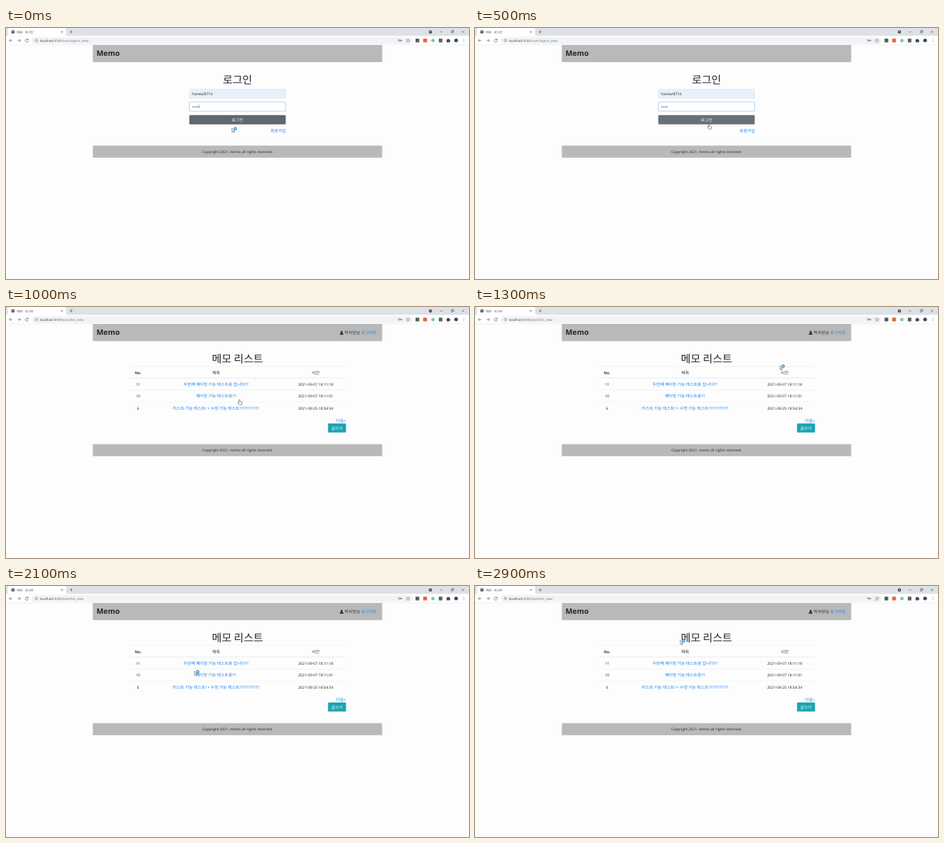
An HTML page for the animation above (3 s loop, 600x325 px).

```html
<!DOCTYPE html>
<html>
<head>
<meta charset="utf-8">
<title>Memo</title>
<style>
  html, body { margin: 0; width: 100%; height: 100%; overflow: hidden; background: #fdfdfd; }
  svg { display: block; width: 600px; height: 325px; }
  text { font-family: "Noto Sans", "Open Sans", "Noto Sans CJK KR", sans-serif; font-size: 4.8px; fill: #2b2f33; text-rendering: geometricPrecision; }
  .ko { font-family: "Noto Sans CJK KR", "Noto Sans CJK JP", "Noto Sans", sans-serif; font-size: 5.4px; }
  .mid { text-anchor: middle; }
  .end { text-anchor: end; }
  .link { fill: #1a82f0; }
  .light { fill: #fff; }
  .title { font-size: 13.8px; fill: #212529; }
  .copy { font-size: 4.67px; }
  .tab { font-size: 4.05px; fill: #4a4d51; }
  .url { font-size: 4.2px; fill: #75797e; }
  .bar { fill: #b9b9b9; }
  .ico { fill: none; stroke: #5f6368; stroke-width: .65; }
</style>
</head>
<body>
<svg viewBox="0 0 600 325">
  <rect width="600" height="325" fill="#fdfdfd"/>

  <g id="browser">
    <rect width="600" height="10.4" fill="#dee1e6"/>
    <path d="M1 10.4Q2.5 10.4 2.5 8.5V2.5Q2.5 0 5 0H75.5Q78 0 78 2.5V8.5Q78 10.4 79.5 10.4Z" fill="#fff"/>
    <g id="globe">
      <circle cx="9" cy="5" r="2.3" fill="#4d5156"/>
      <path d="M7.4 4.2l1.5 .5 .3 1.2 M9.3 3.3l1 1" stroke="#fff" stroke-width=".6" fill="none"/>
    </g>
    <text id="tabTitle" class="ko tab" x="14" y="6.6"/>
    <path class="ico" d="M71.2 3.8l2.5 2.5m0-2.5l-2.5 2.5M82.5 5h4M84.5 3v4"/>
    <circle cx="550" cy="5.1" r="2.2" fill="#44474b"/>
    <path d="M549 4.6h2l-1 1.2z" fill="#fff"/>
    <path class="ico" stroke="#333" d="M562.4 5h3.2M577 4.1h2.3v2.3H577zM577.8 4V3.3h2.3v2.3h-.7M590.9 3.6l2.8 2.8m0-2.8l-2.8 2.8"/>
    <rect y="10.4" width="600" height="11.4" fill="#fff"/>
    <rect x="33" y="11.8" width="494" height="8.9" rx="4.4" fill="#f1f3f4"/>
    <path class="ico" d="M8.3 16.2H4.4M6.2 14.3l-1.9 1.9 1.9 1.9"/>
    <path class="ico" stroke="#999da2" d="M14.8 16.2h4M17 14.3l1.9 1.9-1.9 1.9"/>
    <path id="reload" class="ico" d="M28.7 15.2A2 2 0 1 0 29 16.8M28.9 13.9v1.6h-1.6"/>
    <path id="stop" class="ico" d="M25.4 14.6l3.2 3.2m0-3.2l-3.2 3.2"/>
    <circle class="ico" cx="39.4" cy="16.2" r="1.7" style="stroke-width:.45"/>
    <path class="ico" d="M39.4 16v1.1M39.4 15v.5" style="stroke-width:.45"/>
    <text class="url" x="44" y="17.7"><tspan fill="#3c4043">localhost</tspan><tspan id="path"/></text>
    <circle class="ico" cx="509.5" cy="16.1" r="1.1" stroke-width=".9"/>
    <path class="ico" d="M510.6 16.1h2.7M512.4 16.1v1.2" style="stroke-width:.9"/>
    <path class="ico" d="M521 13.9l.7 1.6 1.7.1-1.3 1.1.4 1.7-1.5-.9-1.5.9.4-1.7-1.3-1.1 1.7-.1z" style="stroke-width:.45"/>
    <rect x="530.7" y="13.8" width="4.8" height="4.8" fill="#55585c"/>
    <rect x="540.6" y="13.8" width="5" height="4.8" fill="#ee6135"/>
    <circle cx="553.3" cy="16.2" r="2.3" fill="#74d195"/>
    <rect x="560.9" y="13.8" width="4.6" height="4.8" fill="#5b5e62"/>
    <path d="M571 14.7h1.4a.8.8 0 0 1 1.6 0h1.2v1.3a.8.8 0 0 1 0 1.6v1h-4.2z" fill="#45484c"/>
    <rect x="580.9" y="13.8" width="4.8" height="4.8" rx="2.4" fill="#354a66"/>
    <path d="M593.2 14.3v.7m0 .9v.7m0 .9v.7" stroke="#5f6368" stroke-width=".8"/>
    <path d="M0 21.9H600" stroke="#dcdfe3" stroke-width=".35"/>
  </g>

  <rect class="bar" x="112.5" y="22" width="375" height="22.2"/>
  <text x="117.3" y="36.2" style="font-size:9.6px;font-weight:600;fill:#212529">Memo</text>

  <g id="login">
    <text class="ko title mid" x="300" y="71.5">로그인</text>
    <rect x="237.6" y="79.2" width="124.8" height="11.7" rx="1.2" fill="#e8f0fe" stroke="#ced4da" stroke-width=".35"/>
    <text x="241.3" y="86.9">haneul4716</text>
    <rect id="ring" x="237" y="95.4" width="126" height="12.9" rx="1.7" fill="#bfdeff"/>
    <rect id="pass" x="237.6" y="96" width="124.8" height="11.7" rx="1.2" fill="#fff" stroke-width=".4"/>
    <g id="dots" fill="#2b2f33"></g>
    <path id="caret" d="M250.1 99.4v5" stroke="#222" stroke-width=".4"/>
    <rect id="button" x="237.5" y="112.8" width="125" height="12" rx="1.2"/>
    <text class="ko mid light" x="300" y="120.8">로그인</text>
    <text class="ko end link" x="362.7" y="135.4">회원가입</text>
  </g>

  <g id="list">
    <circle cx="434.9" cy="32.2" r="1.25" fill="#212529"/>
    <path d="M432.6 35.8v-.7q0-1.5 1.5-1.5h1.6q1.5 0 1.5 1.5v.7z" fill="#212529"/>
    <text class="ko" x="438.8" y="35.2">박서담님</text>
    <text class="ko link end" x="480.2" y="35.2">로그아웃</text>
    <text class="ko title mid" x="300" y="71.5">메모 리스트</text>
    <g id="table"></g>
    <text class="ko link end" x="440.3" y="149.2">다음»</text>
    <rect x="417.3" y="150.8" width="23.3" height="11.8" rx="1.2" fill="#1ba3b1"/>
    <text class="ko mid light" x="429" y="158.8">글쓰기</text>
  </g>

  <g id="footer">
    <rect class="bar" x="112.5" width="375" height="15.6"/>
    <text class="mid copy" x="300" y="9.7">Copyright 2021. memo all rights reserved.</text>
  </g>

  <g id="cursor">
    <g id="busy">
      <path d="M0 0V5.3L1.3 4.1 2.2 6 3 5.6 2.1 3.8H3.7Z" fill="#fff" stroke="#222" stroke-width=".4"/>
      <circle cx="4.3" cy=".7" r="1.6" fill="#cfeaff" stroke="#1f86d8" stroke-width="1.1"/>
    </g>
    <path id="hand" d="M-.6 .5Q0-.4 .6 .5V2.7L3 3.2Q3.6 3.4 3.5 4.2L3 6.7H-.1L-2 4.2Q-1.8 3.4-.6 4.2Z" fill="#fff" stroke="#222" stroke-width=".45"/>
  </g>
</svg>

<script>
const STEP = 100, LOOP = 3000;
const $ = id => document.getElementById(id);
const show = (id, on) => $(id).setAttribute("visibility", on ? "inherit" : "hidden");

function add(parent, tag, attrs, text = "") {
  const el = document.createElementNS("http://www.w3.org/2000/svg", tag);
  for (const key in attrs) el.setAttribute(key, attrs[key]);
  el.textContent = text;
  $(parent).append(el);
}

for (let i = 0; i < 4; i++) add("dots", "circle", { cx: 242.3 + i * 2.15, cy: 102.1, r: .72 });

const rows = [
  ["11", "두번째 페이징 기능 테스트용 입니다!!!", "2021-09-07 18:11:18"],
  ["10", "페이징 기능 테스트용!!!", "2021-09-07 18:11:01"],
  ["6", "리스트 기능 테스트! + 수정 기능 테스트" + "!".repeat(15), "2021-08-25 18:54:34"]
];
const cell = (x, y, text, cls, weight = 400) =>
  add("table", "text", { x, y, class: "mid " + cls, "font-weight": weight }, text);

[76.8, 92, 107.6, 123].forEach((y, i) =>
  add("table", "path", { d: `M159.3 ${y}H440.6`, stroke: "#dee2e6", "stroke-width": i === 1 ? .7 : .4 }));
cell(171.2, 86.5, "No.", "", 700);
cell(272.3, 86.5, "제목", "ko", 500);
cell(401.3, 86.5, "시간", "ko", 500);
rows.forEach(([no, title, date], i) => {
  const y = 101.9 + i * 15.35;
  cell(171.2, y, no, "");
  cell(272.3, y, title, "ko link");
  cell(401.3, y, date, "");
});

// Pointer keys: time, x, y, shape
const track = [
  [0, 292.8, 129.6, "busy"], [100, 294, 133, "busy"], [200, 297, 135, "busy"],
  [300, 300, 133, "busy"], [400, 302, 129, "busy"], [500, 303, 124.3, "hand"],
  [600, 302.4, 119.7, "hand"], [1200, 330, 108, "busy"], [1300, 395, 76, "busy"],
  [1400, 450, 46, "busy"], [1500, 472, 32, "hand"], [1600, 472, 32, ""],
  [1700, 400, 66, "busy"], [1800, 335, 140, "busy"], [1900, 262, 155, "busy"],
  [2000, 218, 136, "busy"], [2100, 244.2, 110.2, "busy"], [2200, 268, 64, "busy"],
  [2300, 322, 70, "busy"], [2400, 363, 110, "busy"], [2500, 352, 148, "busy"],
  [2600, 334, 156, "busy"], [2700, 290, 146, "busy"], [2800, 256, 106, "busy"],
  [2900, 266, 70.2, "busy"]
];
const buttonColors = [[0, "#5f676e"], [100, "#6c757d"], [500, "#687077"], [600, "#5a6268"], [900, "#545b62"]];
const at = (keys, t) => keys.findLast(key => key[0] <= t);

function draw(t) {
  const loading = t === 900, listed = t >= 1000, focused = t < 900;
  show("login", !listed);
  show("list", listed);
  show("globe", !loading);
  show("reload", !loading);
  show("stop", loading);
  show("ring", !listed && focused);
  show("caret", t < 500);
  $("pass").setAttribute("stroke", focused ? "#80bdff" : "#c3d2e2");
  $("button").setAttribute("fill", at(buttonColors, t)[1]);
  $("tabTitle").textContent = listed ? "메모 - 리스트" : "메모 - 로그인";
  $("path").textContent = listed ? ":8080/post/list_view" : ":8080/user/signin_view";
  $("footer").setAttribute("transform", `translate(0 ${listed ? 177.6 : 152.3})`);

  const [, x, y, shape] = at(track, t);
  $("cursor").setAttribute("transform", `translate(${x} ${y})`);
  show("busy", shape === "busy");
  show("hand", shape === "hand");
}

let last = -1;
const start = performance.now();
function tick() {
  const t = Math.floor((performance.now() - start) % LOOP / STEP) * STEP;
  if (t !== last) draw(last = t);
  requestAnimationFrame(tick);
}
tick();
</script>
</body>
</html>
```
